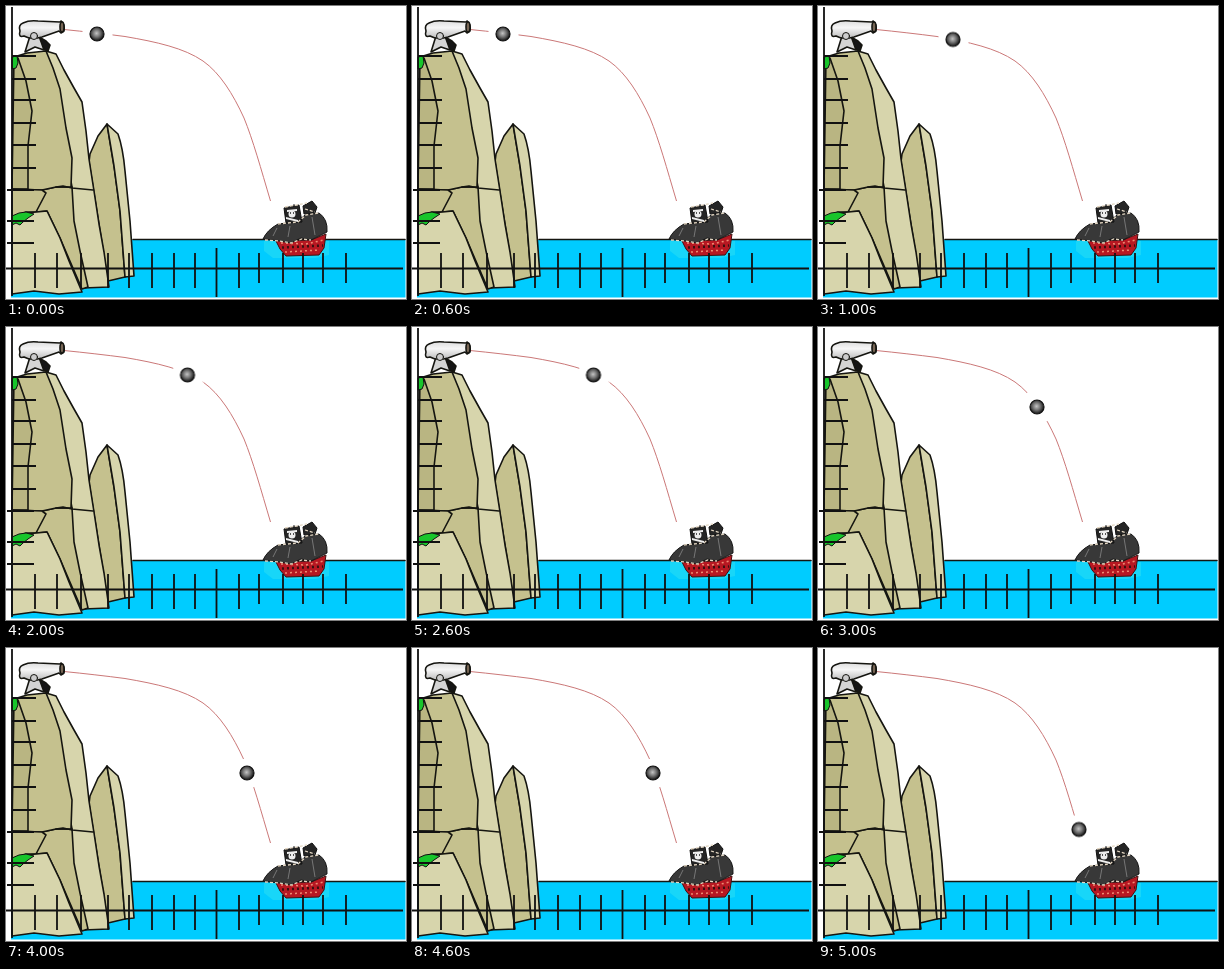
An HTML page that plays this animation: 400 px wide and 293 px high, repeating every 6 s.

```html
<!DOCTYPE html>
<html lang="en">
<head>
<meta charset="utf-8">
<title>Cannon shot</title>
<style>
html, body { margin: 0; width: 100%; height: 100%; overflow: hidden; background: #fff; }
svg { display: block; width: 400px; height: 293px; }
.ink { stroke: #151510; stroke-width: 1.6; stroke-linejoin: round; stroke-linecap: round; }
.line { fill: none; }
.front { fill: #c5c18e; }
.side { fill: #d7d5ac; }
.shade { fill: #b9b582; }
#shot { animation: fly 6s step-end infinite; }
@keyframes fly {
  0% { transform: translate(91px, 28px); }
  16.6667% { transform: translate(135px, 33.5px); }
  33.3333% { transform: translate(181.5px, 48px); }
  50% { transform: translate(219px, 80px); }
  66.6667% { transform: translate(241px, 125px); }
  83.3333%, 100% { transform: translate(261px, 181.5px); }
}
</style>
</head>
<body>
<svg viewBox="0 0 400 293">
  <defs>
    <radialGradient id="iron" cx=".47" cy=".45" r=".55">
      <stop offset="0" stop-color="#c4c4c4"/>
      <stop offset=".5" stop-color="#707070"/>
      <stop offset=".9" stop-color="#222"/>
    </radialGradient>
    <linearGradient id="barrel" x2="0" y2="1">
      <stop offset="0" stop-color="#ddd"/>
      <stop offset=".4" stop-color="#f6f6f6"/>
      <stop offset="1" stop-color="#bbb"/>
    </linearGradient>
  </defs>

  <path fill="none" stroke="#cb7878" d="M58 23.5C78 25.500 100 28 119 30.500C151 36 178 42 197 55C214 67 227 88 238 112C247 134 255 163 264.500 195"/>
  <g id="shot">
    <rect x="-14.500" y="-14" width="30" height="28" fill="#fff"/>
    <circle r="7" fill="url(#iron)" stroke="#111" stroke-width="1.200"/>
  </g>

  <path fill="#00ccff" d="M5 234H399.500V291.500H5Z"/>
  <path class="ink line" stroke-width="1.300" d="M127 233.500H399"/>

  <g class="ink">
    <path class="front" d="M83 156L84 148L92 130L101 118L108 160L114 205L119 271L102 275Z"/>
    <path class="side" d="M101 118L112 128Q117 142 119 165L124 215L128 270L119 271L114 205L108 160Z"/>
    <path class="side" d="M40 45L50 48L58 64L68 82L76 96L80 125L83 153L88 185L93 218L98 246L103 281L77 282L60 205L66 181Z"/>
    <path class="front" d="M36 184L50 181L66 181L68 215L74 245L82 281L76 283L54 232L41 205L30 206Z"/>
    <path class="front" d="M8 51L21 47L40 45L47 62L54 83L60 122L66 152L65 181L50 181L36 184L6 183Z"/>
    <path class="shade" d="M8 51L12 52L20 75L26 105L22 140L22 183L6 183Z"/>
    <path class="front" d="M6 183L36 184L40 187L30 206L20 206L6 212Z"/>
    <path class="line" d="M50 181L57 180L66 182L87 184"/>
    <path class="side" d="M6 212L20 207L41 205L54 232L63 255L76 286L53 288L28 285L6 288Z"/>
  </g>
  <g fill="#18c52b" stroke="#111">
    <path d="M6 51L11 50L12 57L10 62L6 63Z"/>
    <path d="M6 210L13 207L20 206L28 208L22 212L17 216L14 219L10 217L6 219Z"/>
  </g>

  <g class="ink" stroke-width="1.200">
    <path fill="#151515" d="M33 31L40 35L44 39L42 45L37 43Z"/>
    <path fill="#d4d4d4" d="M19 46L24 30L33 30L38 44L29 41Z"/>
    <path fill="url(#barrel)" d="M17 17Q23 14 32 15L54 16L55 15Q59 18 58 25L55 27L53 25L36 31Q25 34 18 30Q12 32 14 25Q12 19 17 17Z"/>
    <ellipse cx="56" cy="21" rx="2" ry="5" fill="#765"/>
    <circle cx="28" cy="30" r="3.500" fill="#ccc" stroke-width="1"/>
  </g>

  <path fill="#18d6f8" d="M258 235H323V249L309 252H267L258 245Z"/>
  <g stroke-linejoin="round">
    <path fill="#b71822" stroke="#401010" d="M268 231L278 235L305 234L320 228L318 242L313 249L280 250L274 243Z"/>
    <path fill="none" stroke="#ee8b72" stroke-width="1.500" stroke-dasharray="2 3" d="M275 237L300 238L318 234M279 246L314 244"/>
    <path fill="none" stroke="#3a1010" stroke-width="2.500" stroke-dasharray="2 3" d="M276 241.500L317 239.500"/>
    <path fill="none" stroke="#222" d="M288 198V236M304 196V234"/>
    <path fill="#383838" stroke="#151515" d="M257 233Q261 224 272 218L291 216L299 209L313 207Q322 213 321 226L305 234L295 232L285 237L273 235Z"/>
    <path fill="#252525" stroke="#111" d="M278 202L293 199L296 216L280 217ZM297 200L306 195L311 201L309 207L298 208Z"/>
    <path fill="none" stroke="#e3d6c2" stroke-width="1.300" stroke-dasharray="3 2" d="M259 234L273 235L285 237L296 233L305 234M279 201L291 199L301 197M272 218L292 216L300 209L313 207M299 203L309 206"/>
    <path fill="none" stroke="#777" d="M271 222L267 230M284 220L282 231M306 211L309 229"/>
    <g fill="#eee">
      <circle cx="286" cy="208" r="3.500"/>
      <path d="M280 211L292 214V216L280 213ZM281 204L291 203V205L281 206Z"/>
    </g>
    <path fill="none" stroke="#222" stroke-width="1.500" d="M284 207H285M287 207H288"/>
  </g>

  <path id="axes" fill="none" stroke="#111" stroke-width="1.800"/>
</svg>
<script>
const tick = (x, y, dx, dy) => `M${x} ${y}l${dx} ${dy}`;
const rows = [50, 73, 94, 117, 139, 162, 184, 215, 237];
const columns = [29, 51, 75, 102, 123, 146, 168, 189, 233, 253, 277, 297, 317, 340];
document.getElementById('axes').setAttribute('d',
  'M6 1V290M0 262.5H397M210.5 242V291' +
  rows.map((y, i) => tick(i < 6 ? 6 : 1, y, i < 6 ? 24 : 27, 0)).join('') +
  columns.map(x => tick(x, 247, 0, x > 240 ? 30 : 35)).join(''));
</script>
</body>
</html>
```
